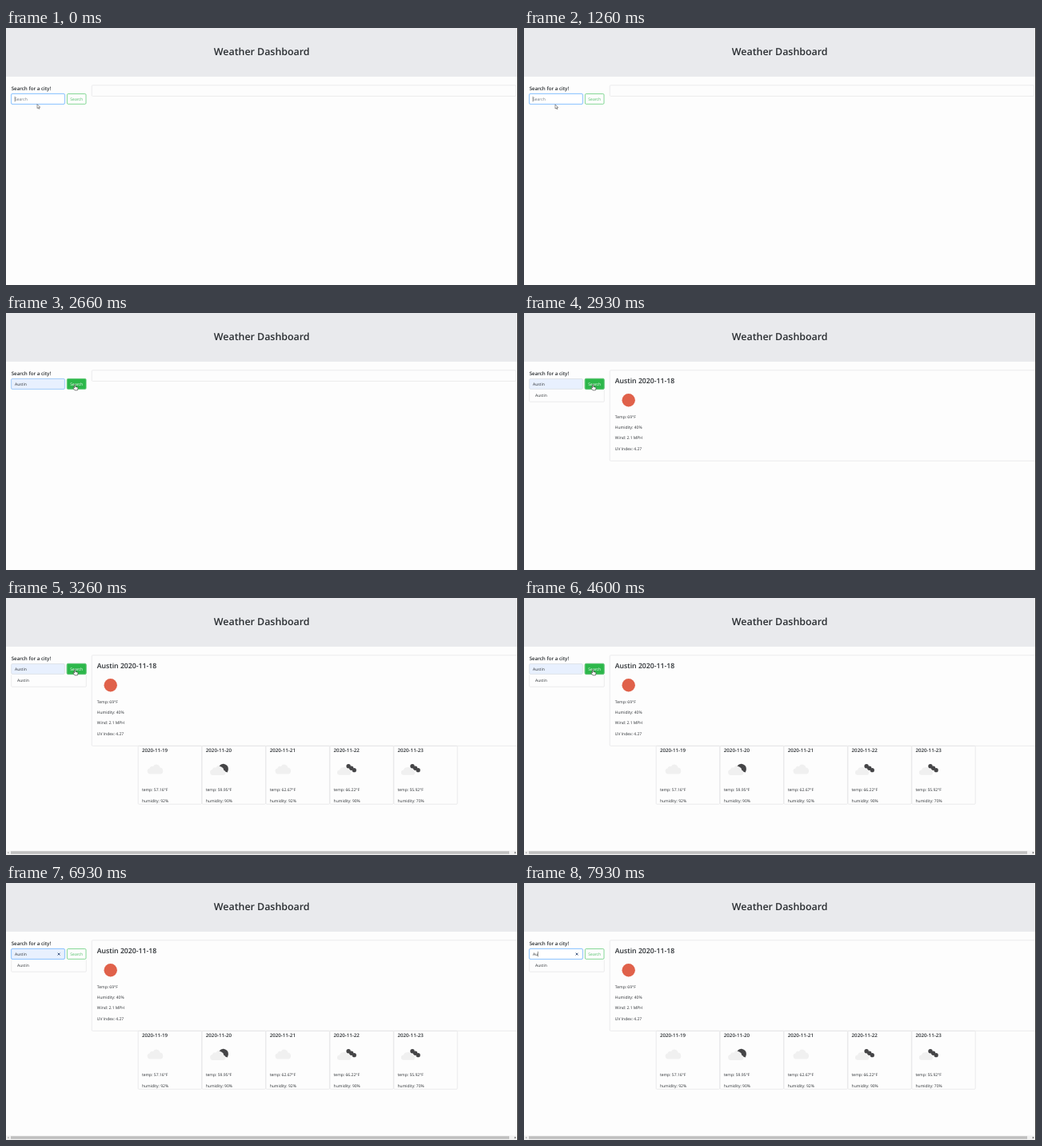
An HTML page that plays this animation: 640 by 322 pixels, repeating every 8000 ms.

```html
<!DOCTYPE html>
<html lang="en">
<head>
<meta charset="utf-8">
<title>Weather Dashboard</title>
<style>
html, body { margin: 0; width: 100%; height: 100%; overflow: hidden; background: #fdfdfd; }
svg { display: block; width: 640px; height: 322px; }
text { font: 5px "Open Sans", "Noto Sans", sans-serif; fill: #2a2e32; white-space: pre; text-rendering: geometricPrecision; }
.h1 { font-size: 12.4px; font-weight: 600; text-anchor: middle; }
.h3 { font-size: 8.7px; font-weight: 600; }
.h5 { font-size: 6.2px; font-weight: 600; }
.line { fill: none; stroke: #e4e4e5; stroke-width: .7; }
</style>
</head>
<body>
<svg viewBox="0 0 640 322">
  <defs>
    <path id="cloud" d="M-7 6a3.5 3.5 0 0 1-.6-6.9A3.8 3.8 0 0 1-3-3.6 4.6 4.6 0 0 1 5.5-2 4.1 4.1 0 0 1 6.4 6z" fill="#f0f0f0"/>
    <g id="few">
      <use href="#cloud" x="-1.5" y="1.5"/>
      <path d="M-.4-4Q2-7.3 6-6.6 11-5.2 11-.2 11 2 9.8 4L7.6 3.3Q6.8 1.8 5.4 1.3 5-1.6 2.6-2.8 1-3.6-.4-4z" fill="#454547"/>
    </g>
    <g id="broken">
      <g fill="#454547">
        <circle cx="1.4" cy="-3.7" r="2.7"/><circle cx="5" cy="-1.2" r="2.7"/><circle cx="8.6" cy="1.2" r="2.6"/>
      </g>
      <path d="M-9.5 7.3a3.2 3.2 0 0 1 0-6.4 4 4 0 0 1 4-3.2 4.4 4.4 0 0 1 5.4 2.2 3 3 0 0 1 4 3 3 3 0 0 1-1.2 4.4z" fill="#f0f0f0"/>
    </g>
  </defs>

  <rect width="639" height="61" fill="#e9eaed"/>
  <text class="h1" x="319.7" y="34.3">Weather Dashboard</text>
  <text class="h5" x="6.7" y="78.3">Search for a city!</text>

  <rect id="field" x="6.7" y="82.5" width="66.6" height="12.8" rx="1.3" stroke-width=".7"/>
  <rect id="fieldRing" x="6.4" y="82.2" width="67.2" height="13.4" rx="1.6" fill="none" stroke="#80bdff" stroke-width=".9"/>
  <text id="typed" x="11" y="91"></text>
  <path id="caret" d="M0 85.8v6.6" stroke="#222" stroke-width=".5"/>
  <path id="clear" d="M64.7 87.7l2.8 2.8m0-2.8l-2.8 2.8" stroke="#24406f" stroke-width=".9"/>

  <rect id="buttonRing" x="76.1" y="82.2" width="24.2" height="13.4" rx="1.5" fill="none" stroke="#3fa356" stroke-width=".9"/>
  <rect id="button" x="76.4" y="82.5" width="23.6" height="12.8" rx="1.3" stroke="#52c86a" stroke-width=".7"/>
  <text id="buttonText" x="88.2" y="91" text-anchor="middle">Search</text>

  <text id="suggestion" x="14" y="105.4">Austin</text>
  <g id="history">
    <path class="line" d="M6.7 96.5V110.3q0 1 1 1H99.3q1 0 1-1V96.5"/>
    <text x="14" y="105.4">Austin</text>
  </g>

  <rect id="panel" class="line" x="107.2" y="71.8" rx="1.2"/>
  <g id="today">
    <text class="h3" x="113.8" y="88">Austin 2020-11-18</text>
    <circle cx="130.7" cy="109.2" r="8.2" fill="#e0614a"/>
    <text x="113.8" y="131.5">Temp: 69°F</text>
    <text x="113.8" y="144.9">Humidity: 40%</text>
    <text x="113.8" y="158.2">Wind: 2.1 MPH</text>
    <text x="113.8" y="171.5">UV Index: 4.27</text>
  </g>
  <g id="forecast"></g>
  <g id="scroll">
    <path d="M0 316.6H639V322H0z" fill="#f1f1f1"/>
    <path d="M6 317.2H629V320.8H6z" fill="#bfbfbf"/>
    <path d="M3.4 317.8v2.6l-1.5-1.3z" fill="#999"/>
    <path d="M635.8 317.8v2.6l1.5-1.3z" fill="#444"/>
  </g>
  <path d="M639.5 0V322" stroke="#333"/>

  <g id="pointer" fill="#fff" stroke="#333" stroke-width=".5" stroke-linejoin="round">
    <path id="arrow" d="M0 0V5.2L1.2 4.1 2 5.9 2.9 5.5 2.1 3.8H3.7z"/>
    <path id="hand" transform="scale(1.2)" d="M-.6 .4q.6-.7 1.1 0V2.4l2 .5q.7.2.7.9L2.6 6.1H-.2L-2 3.6q.1-.8.9-.4l.5.5z"/>
    <path id="beam" d="M-1-2.6H1M0-2.6V2.6M-1 2.6H1" fill="none"/>
  </g>
</svg>
<script>
const el = {};
for (const node of document.querySelectorAll('svg [id]')) el[node.id] = node;

const days = [
  ['19', 'cloud', '57.16', 92], ['20', 'few', '59.95', 90], ['21', 'cloud', '62.67', 92],
  ['22', 'broken', '66.22', 90], ['23', 'broken', '55.92', 70]
];
el.forecast.innerHTML = days.map(([day, icon, temp, humidity], i) =>
  `<g transform="translate(${165 + i * 79.9})">
    <rect class="line" x=".2" y="185.3" width="79.4" height="73" rx="1"/>
    <text class="h5" x="4.9" y="192.7">2020-11-${day}</text>
    <use href="#${icon}" x="22" y="214.5"/>
    <text x="4.9" y="242.4">temp: ${temp}°F</text>
    <text x="4.9" y="255.8">humidity: ${humidity}%</text>
  </g>`).join('');

// [time, value] lists: the last entry already reached holds
const typing = [[0, ''], [1400, 'A'], [1930, 'Austin'], [7460, 'Austi'], [7530, 'Aust'],
  [7800, 'Aus'], [7930, 'Au']];
const path = [[0, 39, 95.5], [1730, 39, 96], [1900, 33, 103], [1960, 34, 102.5], [2200, 81.8, 87.5],
  [2530, 86.2, 89.5], [6129, 86.2, 89.5], [6130, 81, 89.5], [6400, 50, 89.5], [6700, 40, 89]];

const between = (t, from, to) => t >= from && t < to;
const ramp = (t, from, length = 150) => {
  const p = Math.min(1, Math.max(0, (t - from) / length));
  return p * p * (3 - 2 * p);
};
const mix = (a, b, p) => `rgb(${a.map((v, i) => Math.round(v + (b[i] - v) * p))})`;
const show = (node, on) => { node.style.display = on ? '' : 'none'; };

function pointerAt(t) {
  const i = path.findLastIndex(key => key[0] <= t);
  const [t0, x0, y0] = path[i];
  const [t1, x1, y1] = path[i + 1] || [t0 + 1, x0, y0];
  const p = Math.min(1, (t - t0) / (t1 - t0));
  return [x0 + (x1 - x0) * p, y0 + (y1 - y0) * p];
}

function drawForm(t) {
  const value = typing.findLast(step => step[0] <= t)[1];
  const focused = t < 2600 || t >= 6780;
  const glow = 1 - ramp(t, 2600) + ramp(t, 6780);
  const hover = ramp(t, 2130) - ramp(t, 6160);

  el.typed.textContent = value || 'Search';
  el.typed.style.fill = value ? '#2a2e32' : '#6c757d';
  el.field.setAttribute('fill', between(t, 1930, 7460) ? '#e8f0fe' : '#fff');
  el.field.setAttribute('stroke', mix([214, 219, 225], [128, 189, 255], glow));
  el.fieldRing.setAttribute('opacity', glow * .6);
  show(el.clear, value && focused);

  const caretOn = t < 730 || between(t, 1260, 2130) || t >= 7460;
  const caretX = value ? 11.2 + el.typed.getComputedTextLength() : 11.2;
  el.caret.setAttribute('transform', `translate(${caretX})`);
  show(el.caret, caretOn);

  el.button.setAttribute('fill', mix([253, 253, 253], [44, 183, 74], hover));
  el.buttonText.style.fill = mix([74, 190, 98], [255, 255, 255], hover);
  el.buttonRing.setAttribute('opacity', .7 * (ramp(t, 2600) - ramp(t, 6780)));
}

function drawPointer(t) {
  const [x, y] = pointerAt(t);
  const onButton = x > 76;
  const onField = !onButton && x < 74 && y < 95;
  el.pointer.setAttribute('transform', `translate(${x} ${y})`);
  show(el.pointer, !between(t, 1400, 1730) && t < 6930);
  show(el.hand, onButton);
  show(el.beam, onField);
  show(el.arrow, !onButton && !onField);
}

function drawResults(t) {
  const loaded = t >= 2800;
  show(el.suggestion, between(t, 1460, 1930));
  show(el.history, t >= 2670);
  show(el.today, loaded);
  el.panel.setAttribute('width', loaded ? 540 : 530.5);
  el.panel.setAttribute('height', loaded ? 113.5 : 13.6);
  show(el.forecast, t >= 3000);
  show(el.scroll, t >= 3000);
}

function frame() {
  const t = performance.now() % 8000;
  drawForm(t);
  drawPointer(t);
  drawResults(t);
  requestAnimationFrame(frame);
}
frame();
</script>
</body>
</html>
```
